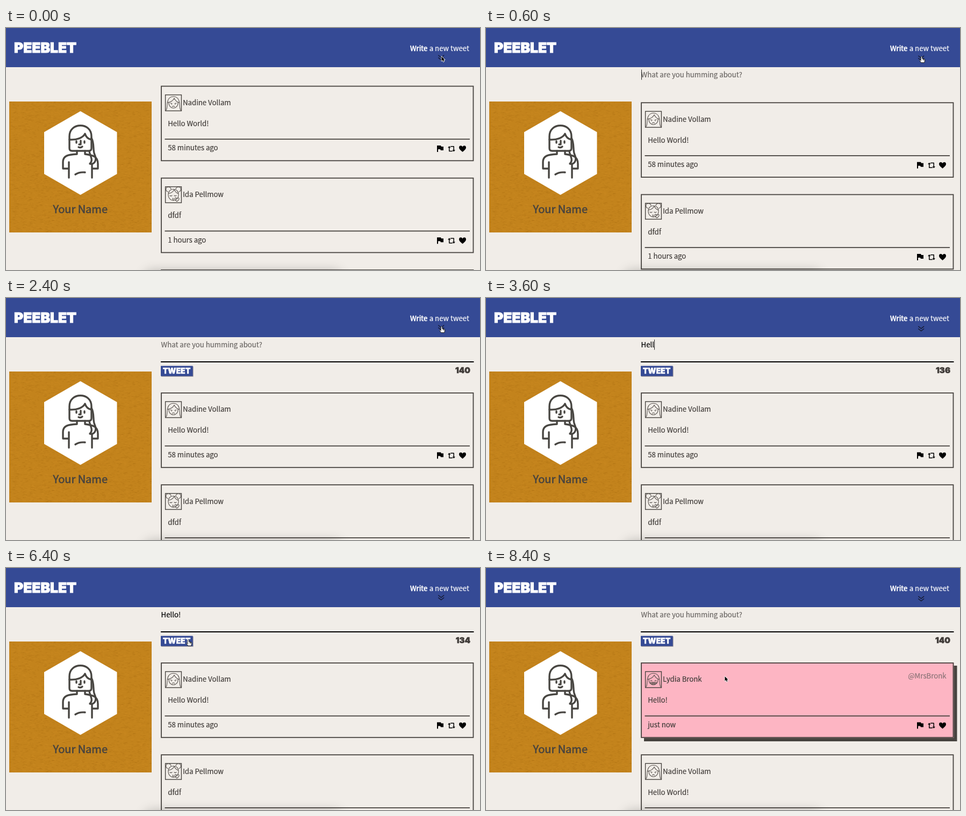
Animation, 882 px wide and 451 px high, one loop 8.6 s. Source, as an HTML page with a canvas:

```html
<!DOCTYPE html>
<html lang="en">
<head>
<meta charset="utf-8">
<style>
html, body { margin: 0; width: 100%; height: 100%; overflow: hidden; background: #f1ede8; }
canvas { display: block; }
</style>
</head>
<body>
<canvas id="stage" width="882" height="451"></canvas>
<script>
const ctx = document.getElementById('stage').getContext('2d');
const LOOP = 8600, STEP = 200;
const BLUE = '#354a95', PAPER = '#f1ede8', INK = '#47433f', PINK = '#fdb5c3';
const SANS = '"Noto Sans CJK SC", "Noto Sans CJK JP", "Noto Sans CJK", "Open Sans", sans-serif';
const BLOCK = 'Inter, "Lato", sans-serif';
const COMPOSE_HEIGHT = 68.5, SLIDE_START = 413, SLIDE_TIME = 400, POST_TIME = 7200, HOVER_TIME = 8200;
const MESSAGE = 'Hello!', KEY_TIMES = [2800, 3000, 3200, 3600, 3800, 4800];

const POSTS = [
  { name: 'Nadine Vollam', text: 'Hello World!', age: '58 minutes ago', face: 'sad' },
  { name: 'Ida Pellmow', text: 'dfdf', age: '1 hours ago', face: 'kiss' },
  { name: '', text: '', age: '', face: 'sad' }
];
const NEW_POST = { name: 'Lydia Bronk', handle: '@MrsBronk', text: MESSAGE, age: 'just now', face: 'grin' };

const LONG_HAIR = 'M2 29C5 24 3 17 5 12C8 1 23 1 26 12C28 17 26 24 29 29 M7 14C6 29 25 29 24 14 M5 15C11 14 15 11 17 7C19 11 22 14 26 15';
const FACES = {
  sad: LONG_HAIR + 'M10 16l3 1 M21 16l-3 1 M12 18v.5 M19 18v.5 M13.5 22.5q2-2 4 0',
  grin: LONG_HAIR + 'M10 18q1.5-2 3 0 M18 18q1.5-2 3 0 M10 20.5h11c0 6-11 6-11 0z M11 22.5h9 M13.5 21v3.5 M15.5 21v4 M17.5 21v3.5',
  kiss: 'M6 15C6 2 25 2 25 15C25 30 6 30 6 15z M5 10C0 8 1 1 6 1C9 1 11 3 11 5 M26 10C31 8 30 1 25 1C22 1 20 3 20 5 M7 13Q14 12 17 6Q20 12 24 13 M9 17q2 2 4 0 M17 17q2 2 4 0 M14 22q3 1 0 2q3 1 0 2 M22 28c-8-5-2-9 0-5c2-4 8 0 0 5z'
};
const PORTRAIT = [
  'M118 224V202C118 175 159 175 159 202V224Q159 229 154 229H123Q118 229 118 224z',
  'M118 208C131 209 143 205 147 197C149 204 153 207 159 208',
  'M159 205C165 215 161 228 165 236C170 247 164 255 156 253C163 246 157 240 155 230',
  'M132 229V235C115 236 106 238 106 250V262H117 M117 250V279 M147 229V235C163 237 171 240 171 253V262H160 M160 254V279',
  'M131 211v3 M146 211v3 M139 210v7h-3 M135 222q4 2 7-1 M129 273Q136 268 147 269'
];

function text(str, x, y, { size = 13.2, color = '#403c39', family = SANS, weight = 400, align = 'left', fat = 0.2 } = {}) {
  ctx.font = `${weight} ${size}px ${family}`;
  ctx.textAlign = align;
  ctx.fillStyle = ctx.strokeStyle = color;
  ctx.fillText(str, x, y);
  ctx.lineWidth = fat;
  ctx.lineJoin = 'miter';
  ctx.miterLimit = 2;
  ctx.strokeText(str, x, y);
}

function blockText(str, x, y, options) {
  text(str, x, y, { weight: 900, family: BLOCK, fat: 0.5, ...options });
}

function rect(x, y, w, h, color) {
  ctx.fillStyle = color;
  ctx.fillRect(x, y, w, h);
}

function line(path, color, width) {
  ctx.strokeStyle = color;
  ctx.lineWidth = width;
  ctx.lineJoin = ctx.lineCap = 'round';
  ctx.stroke(new Path2D(path));
}

function fill(path, color) {
  ctx.fillStyle = color;
  ctx.fill(new Path2D(path));
}

function at(x, y, draw) {
  ctx.save();
  ctx.translate(x, y);
  draw();
  ctx.restore();
}

function makeTexture(w, h) {
  const tile = document.createElement('canvas');
  tile.width = w;
  tile.height = h;
  const g = tile.getContext('2d');
  g.fillStyle = '#c3831c';
  g.fillRect(0, 0, w, h);
  let seed = 7;
  const random = () => (seed = seed * 16807 % 2147483647) / 2147483647;
  for (let i = 0; i < 5000; i++) {
    const x = random() * w, y = random() * h, len = 2 + random() * 4;
    g.strokeStyle = random() < 0.5 ? 'rgba(140,86,10,.14)' : 'rgba(224,158,52,.14)';
    g.beginPath();
    g.moveTo(x, y);
    g.lineTo(x + len, y + random() * 3 - 1.5);
    g.stroke();
  }
  return tile;
}
const texture = makeTexture(265, 244);

function drawProfile() {
  ctx.drawImage(texture, 6, 137);
  fill('M138.5 155L206.5 194V272L138.5 311L71 272V194z', '#fff');
  PORTRAIT.forEach(path => line(path, '#484642', 3.4));
  text('Your Name', 138.2, 344.5, { size: 20, color: INK, align: 'center', fat: 0.6 });
}

function drawHeader(t) {
  rect(0, 0, 882, 73, BLUE);
  blockText('PEEBLET', 15, 45.5, { size: 26.3, color: '#fff', fat: 1 });
  text('Write', 752, 43, { color: '#fff', fat: 0.6 });
  text('a new tweet', 862, 43, { color: '#fff', align: 'right' });
  const bob = -Math.cos(t / 800 * Math.PI * 2);
  at(809.7, 52 + bob, () => line('M-5 0L0 4L5 0 M-5 4.5L0 8.5L5 4.5', '#15182b', 1.3));
}

function drawIcons(y) {
  at(802, y - 6, () => fill('M0 0H7L8 2H12V9H7L6 7H2V12H0z', '#000'));
  at(822, y - 6, () => {
    line('M2.8 3V10.5H8.5 M5.5 1.8H11.2V9.5', '#000', 1.5);
    fill('M0 4.2L2.8 1L5.6 4.2z M8.4 8.3L11.2 11.5L14 8.3z', '#000');
  });
  at(849.5, y, () => fill('M0 6C-3 3-6.5 1-6.5-2.5C-6.5-6.5-1.5-7 0-3.5C1.5-7 6.5-6.5 6.5-2.5C6.5 1 3 3 0 6z', '#000'));
}

function drawCard(post, top, hovered) {
  if (hovered) {
    rect(294, top + 6, 582.5, 141, INK);
    rect(288, top, 582.5, 141, PINK);
  }
  ctx.strokeStyle = INK;
  ctx.lineWidth = 1.8;
  ctx.strokeRect(289, top + 1, 580.5, 138.8);
  if (top > 445) return;
  at(296, top + 16.5, () => {
    ctx.strokeStyle = INK;
    ctx.lineWidth = 1.4;
    ctx.strokeRect(0.6, 0.6, 29.8, 29.8);
    line(FACES[post.face], '#57514d', 1.1);
  });
  text(post.name, 329, top + 36.3);
  text(post.text, 301.2, top + 75.3);
  rect(295.5, top + 98.8, 567.5, 1.8, INK);
  text(post.age, 301.2, top + 120.8);
  drawIcons(top + 117.5);
  if (hovered) text(post.handle, 856.5, top + 30, { color: '#8a7477', align: 'right' });
}

function drawCompose(t, open) {
  const typed = t < POST_TIME ? MESSAGE.slice(0, KEY_TIMES.filter(k => k <= t).length) : '';
  ctx.save();
  if (open < COMPOSE_HEIGHT) {
    ctx.beginPath();
    ctx.rect(280, 72, 602, open);
    ctx.clip();
  }
  text(typed || 'What are you humming about?', 288.6, 92, { color: typed ? '#000' : '#6b6764' });
  const caretOn = t < POST_TIME && (t + 500) % 1000 < 500;
  if (caretOn) rect(289 + Math.round(ctx.measureText(typed).width), 77.5, 1, 19, '#222');
  rect(288, 118, 582.5, 2, '#000');
  rect(289, 127.5, 59.5, 19, '#85828c');
  rect(288, 126.5, 59.5, 19, BLUE);
  blockText('TWEET', 317.5, 140.8, { size: 14, color: '#fff', align: 'center' });
  blockText(String(140 - typed.length), 864, 140, { size: 15, align: 'right' });
  ctx.restore();
}

// Pointer path: time, x, y
const PATH = [[0, 810.5, 53], [5000, 810.5, 53], [6200, 339.5, 133.5], [7000, 339.5, 133.5], [8000, 438, 167.5], [8400, 444.5, 202], [LOOP, 444.5, 202]];

function pointerAt(t) {
  const i = PATH.findIndex((p, k) => k && t <= p[0]);
  const [t0, x0, y0] = PATH[i - 1], [t1, x1, y1] = PATH[i];
  const u = (t - t0) / (t1 - t0);
  const k = i === 2 ? u * u * (3 - 2 * u) : u;
  return [x0 + (x1 - x0) * k, y0 + (y1 - y0) * k];
}

function drawPointer(t) {
  if (t >= KEY_TIMES[0] && t < 5000) return;
  const [x, y] = pointerAt(t);
  const onLink = x > 750 && y < 72 && t > 0;
  const onButton = x > 288 && x < 348 && y > 126 && y < 146;
  at(x, y, () => {
    if (onLink || onButton) {
      const hand = 'M-1.3 6V.8Q0-1 1.2.8V4L5.4 5Q6.4 5.4 6.2 7L5.2 11.5H-.8L-3.7 7.5Q-3.5 5.6-1.3 7.5z';
      fill(hand, '#fff');
      line(hand + 'M2.8 4.8v2 M4.5 5.2v1.8', '#111', 0.9);
    } else {
      const arrow = 'M0 0V8.4L2 6.7L3.4 9.8L4.9 9.1L3.5 6.2H6z';
      line(arrow, '#fff', 1.6);
      fill(arrow, '#000');
    }
  });
}

function drawDockShadow() {
  ctx.save();
  ctx.shadowColor = 'rgba(0,0,0,.3)';
  ctx.shadowBlur = 22;
  rect(262, 455, 358, 20, '#000');
  ctx.restore();
}

function draw(t) {
  rect(0, 0, 882, 451, PAPER);
  const progress = Math.min(1, Math.max(0, (t - SLIDE_START) / SLIDE_TIME));
  const open = COMPOSE_HEIGHT * (0.5 - Math.cos(Math.PI * progress) / 2);
  drawProfile();
  const posts = t >= POST_TIME ? [NEW_POST, ...POSTS] : POSTS;
  posts.slice(0, 3).forEach((post, i) => drawCard(post, 107.5 + open + i * 171.2, i === 0 && t >= HOVER_TIME));
  if (open > 0) drawCompose(t, open);
  drawHeader(t);
  drawDockShadow();
  drawPointer(t);
}

const start = performance.now();
function tick(now) {
  const t = Math.max(0, now - start) % LOOP;
  draw(Math.floor(t / STEP) * STEP);
  requestAnimationFrame(tick);
}
draw(0);
requestAnimationFrame(tick);
</script>
</body>
</html>
```
